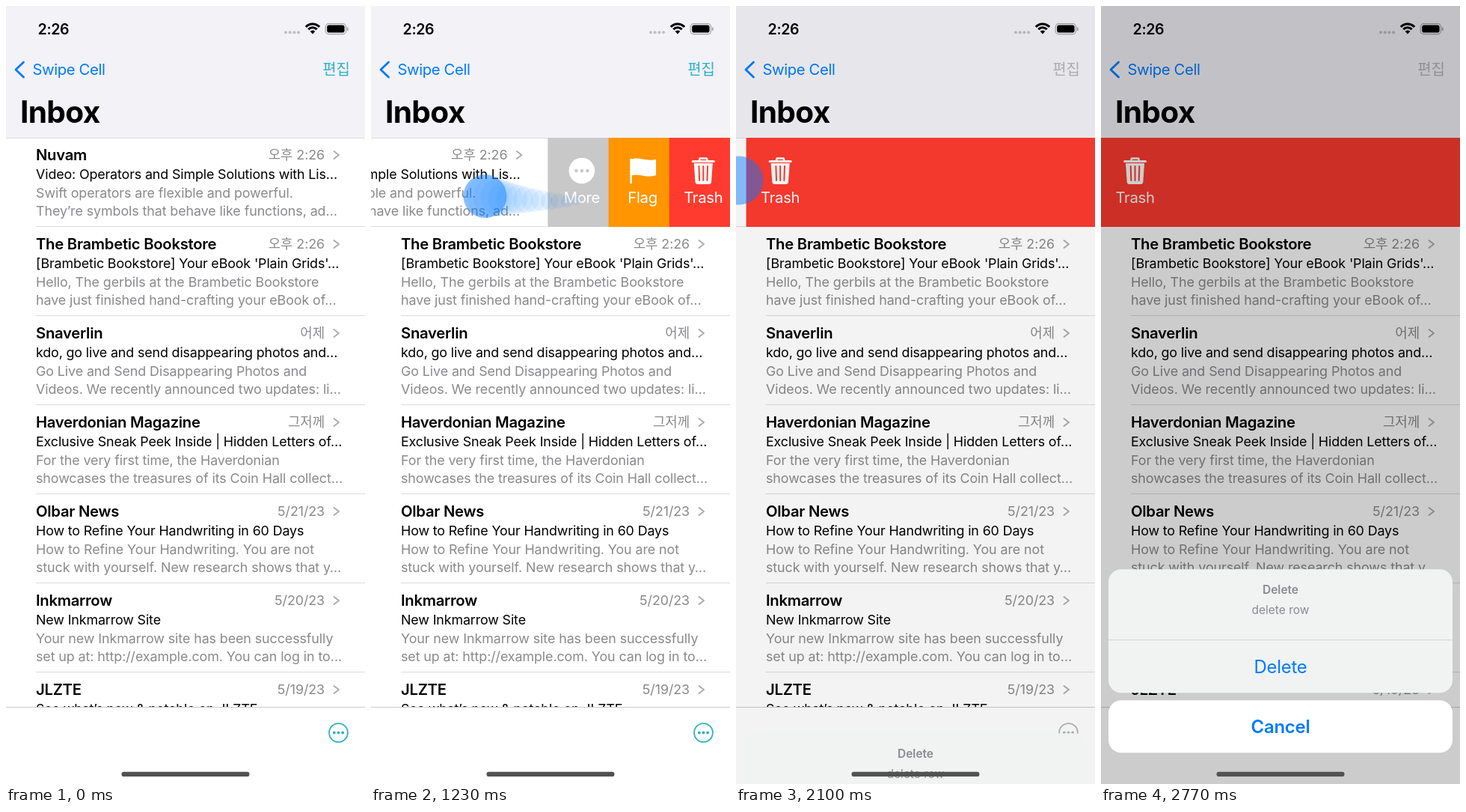
These frames come from a looping animation (480 by 1039 pixels, 3020 ms). An HTML page with a canvas:

```html
<!DOCTYPE html>
<html lang="ko">
<head>
<meta charset="utf-8">
<title>Inbox</title>
<style>
html, body { margin: 0; width: 100%; height: 100%; overflow: hidden; background: #fff; }
canvas { display: block; width: 480px; height: 1039px; }
</style>
</head>
<body>
<canvas id="stage"></canvas>
<script>
const W = 480, H = 1039, LOOP = 3020;
const ROW_TOP = 176, ROW_H = 119, BAR_TOP = 936;
const TOUCH = 970, EXPAND = 1400, RELEASE = 2000, SHEET = 2030;
const FONT = 'Inter, "Noto Sans CJK KR", "Noto Sans CJK", sans-serif';
const BLUE = '#007aff', TEAL = '#30b0c7', GRAY = '#8a8a8d';

const canvas = document.getElementById('stage');
const ctx = canvas.getContext('2d');
const dpr = window.devicePixelRatio || 1;
canvas.width = W * dpr;
canvas.height = H * dpr;

const mails = [
  ['Nuvam', '오후 2:26', 'Video: Operators and Simple Solutions with Lis…',
    'Swift operators are flexible and powerful.', 'They’re symbols that behave like functions, ad…'],
  ['The Brambetic Bookstore', '오후 2:26', "[Brambetic Bookstore] Your eBook 'Plain Grids'…",
    'Hello, The gerbils at the Brambetic Bookstore', 'have just finished hand-crafting your eBook of…'],
  ['Snaverlin', '어제', 'kdo, go live and send disappearing photos and…',
    'Go Live and Send Disappearing Photos and', 'Videos. We recently announced two updates: li…'],
  ['Haverdonian Magazine', '그저께', 'Exclusive Sneak Peek Inside | Hidden Letters of…',
    'For the very first time, the Haverdonian', 'showcases the treasures of its Coin Hall collect…'],
  ['Olbar News', '5/21/23', 'How to Refine Your Handwriting in 60 Days',
    'How to Refine Your Handwriting. You are not', 'stuck with yourself. New research shows that y…'],
  ['Inkmarrow', '5/20/23', 'New Inkmarrow Site',
    'Your new Inkmarrow site has been successfully', 'set up at: http://example.com. You can log in to…'],
  ['JLZTE', '5/19/23', 'See what’s new & notable on JLZTE', '', '']
];

// [time, value] keys
const fingerX = [[970, 418], [1080, 275], [1230, 153], [1350, 122], [1500, 44], [1620, 14], [1800, 7]];
const fingerY = [[970, 242], [1080, 260], [1230, 254], [1350, 248], [1500, 236], [1620, 233.5], [1800, 233]];
const swipe = [[970, 0], [1080, -121], [1230, -243], [1350, -287], [1500, -368], [1620, -428], [1800, -458]];

// Smooth curve through the keys, flat at both ends
function track(keys, t) {
  const last = keys.length - 1;
  if (t <= keys[0][0]) return keys[0][1];
  if (t >= keys[last][0]) return keys[last][1];
  let i = 0;
  while (t > keys[i + 1][0]) i++;
  const slope = k => k === 0 || k === last ? 0 :
    (keys[k + 1][1] - keys[k - 1][1]) / (keys[k + 1][0] - keys[k - 1][0]);
  const [t0, a] = keys[i], [t1, b] = keys[i + 1];
  const d = t1 - t0, u = (t - t0) / d, u2 = u * u, u3 = u2 * u;
  return a * (2 * u3 - 3 * u2 + 1) + b * (3 * u2 - 2 * u3) +
    d * (slope(i) * (u3 - 2 * u2 + u) + slope(i + 1) * (u3 - u2));
}

// Critically damped spring: 0 at start, tends to 1
function settle(ms, rate) {
  const x = Math.max(0, ms) / 1000 * rate;
  return 1 - (1 + x) * Math.exp(-x);
}

function text(str, x, y, size, color, { weight = 400, align = 'left', gap = 0 } = {}) {
  ctx.font = `${weight} ${size}px ${FONT}`;
  ctx.letterSpacing = gap + 'px';
  ctx.textAlign = align;
  ctx.fillStyle = color;
  ctx.fillText(str, x, y);
}

function rect(x, y, w, h, color) {
  ctx.fillStyle = color;
  ctx.fillRect(x, y, w, h);
}

function pill(x, y, w, h, r, color) {
  ctx.fillStyle = color;
  ctx.beginPath();
  ctx.roundRect(x, y, w, h, r);
  ctx.fill();
}

function disc(x, y, r, color) {
  ctx.fillStyle = color;
  ctx.beginPath();
  ctx.arc(x, y, r, 0, Math.PI * 2);
  ctx.fill();
}

function dots(x, y, r, step, color) {
  for (let i = -1; i <= 1; i++) disc(x + i * step, y, r, color);
}

function line(points, width, color) {
  ctx.strokeStyle = color;
  ctx.lineWidth = width;
  ctx.lineCap = ctx.lineJoin = 'round';
  ctx.beginPath();
  points.forEach(([x, y]) => ctx.lineTo(x, y));
  ctx.stroke();
}

function drawMail([from, date, subject, first, second], x, y) {
  const body = { gap: -0.1 };
  text(from, x + 40, y + 30, 20.3, '#000', { weight: 600, gap: -0.28 });
  text(date, x + 426, y + 29, 17.9, GRAY, { align: 'right', gap: -0.1 });
  line([[x + 438.5, y + 18], [x + 445, y + 23], [x + 438.5, y + 28]], 2, '#adadb0');
  text(subject, x + 40, y + 55, 17.9, '#000', { gap: -0.15 });
  text(first, x + 40, y + 79.7, 17.9, GRAY, body);
  text(second, x + 40, y + 104.3, 17.9, GRAY, body);
  rect(x + 40, y + 118, 440, 1, '#dcdcde');
}

function moreIcon(x) {
  disc(x, 220, 17.3, '#fff');
  dots(x, 220, 2.3, 7.5, '#c8c8c8');
}

function flagIcon(x) {
  line([[x - 15.5, 205], [x - 15.5, 236]], 2.6, '#fff');
  ctx.fillStyle = '#fff';
  ctx.beginPath();
  ctx.moveTo(x - 16, 205.5);
  ctx.bezierCurveTo(x - 7, 200, x + 2, 208, x + 18, 205);
  ctx.lineTo(x + 18, 226);
  ctx.bezierCurveTo(x + 3, 231, x - 5, 222, x - 16, 227);
  ctx.fill();
}

function trashIcon(x) {
  line([[x - 14, 207.5], [x + 14, 207.5]], 3, '#fff');
  line([[x - 5.5, 207], [x - 4.5, 203.5], [x + 4.5, 203.5], [x + 5.5, 207]], 2.6, '#fff');
  ctx.fillStyle = '#fff';
  ctx.beginPath();
  ctx.moveTo(x - 12.5, 210);
  ctx.lineTo(x + 12.5, 210);
  ctx.lineTo(x + 10.8, 235);
  ctx.quadraticCurveTo(x + 10.5, 238, x + 7.5, 238);
  ctx.lineTo(x - 7.5, 238);
  ctx.quadraticCurveTo(x - 10.5, 238, x - 10.8, 235);
  ctx.fill();
  for (const s of [-1, 0, 1]) line([[x + s * 5.8, 214], [x + s * 5.2, 233]], 2, '#ff3b30');
}

const actions = [
  ['More', '#c8c8c8', moreIcon],
  ['Flag', '#ff9500', flagIcon],
  ['Trash', '#ff3b30', trashIcon]
];

function drawActions(offset, grown) {
  const edge = W + offset;
  actions.forEach(([label, color, icon], i) => {
    const shift = -offset * i / 3 * (i === 2 ? 1 - grown : 1);
    const x = edge + shift;
    rect(x, ROW_TOP, W - x, ROW_H, color);
    icon(x + 45.5);
    text(label, x + 45.5, 263, 20.3, '#fff', { align: 'center', gap: -0.3 });
  });
}

function drawStatus() {
  text('2:26', 42.6, 37.5, 19.6, '#000', { weight: 600, gap: -0.4 });
  for (let i = 0; i < 4; i++) disc(374 + i * 5.7, 35.2, 2, '#bfbfc3');
  ctx.strokeStyle = '#000';
  ctx.lineCap = 'butt';
  ctx.lineWidth = 3;
  for (const r of [12.5, 7.8]) {
    ctx.beginPath();
    ctx.arc(410, 36.5, r, -Math.PI * 0.76, -Math.PI * 0.24);
    ctx.stroke();
  }
  ctx.fillStyle = '#000';
  ctx.beginPath();
  ctx.moveTo(410, 37.5);
  ctx.arc(410, 37, 4.6, -Math.PI * 0.76, -Math.PI * 0.24);
  ctx.fill();
  ctx.strokeStyle = '#a3a3a7';
  ctx.lineWidth = 1.2;
  ctx.beginPath();
  ctx.roundRect(427.2, 23.6, 27.4, 14, 4.5);
  ctx.stroke();
  pill(429.2, 25.6, 23.4, 10, 2.8, '#000');
  pill(456, 28.2, 1.7, 5, 1, '#a3a3a7');
}

function drawNav(tint) {
  rect(0, 0, W, ROW_TOP, '#f2f2f7');
  drawStatus();
  line([[23.5, 75], [13, 85], [23.5, 95]], 2.8, BLUE);
  text('Swipe Cell', 35.5, 92, 20.3, BLUE, { gap: -0.4 });
  text('편집', 460, 92, 20, tint, { align: 'right' });
  text('Inbox', 19, 156, 40.6, '#000', { weight: 700, gap: -0.65 });
}

function drawToolbar(tint) {
  rect(0, BAR_TOP, W, H - BAR_TOP, '#fff');
  rect(0, BAR_TOP, W, 1, '#cbcbcd');
  ctx.strokeStyle = tint;
  ctx.lineWidth = 1.8;
  ctx.beginPath();
  ctx.arc(444.5, 970.5, 12.4, 0, Math.PI * 2);
  ctx.stroke();
  dots(444.5, 970.5, 1.9, 5.7, tint);
}

function drawSheet(shift) {
  const y = 752 + shift;
  pill(10, y, 460, 165, 17, '#f1f3f3');
  text('Delete', 240, y + 33, 15.5, GRAY, { align: 'center', weight: 600 });
  text('delete row', 240, y + 60, 15.5, GRAY, { align: 'center' });
  rect(10, y + 94, 460, 1, '#d2d4d4');
  text('Delete', 240, y + 139, 23.9, BLUE, { align: 'center', gap: -0.2 });
  pill(10, y + 175, 460, 70, 17, '#fff');
  text('Cancel', 240, y + 219, 23.9, BLUE, { align: 'center', weight: 600, gap: -0.2 });
}

function drawTouch(t) {
  if (t < TOUCH) return;
  const r = 29 - 3 * Math.min(1, Math.max(0, (t - 1600) / 200));
  if (t < RELEASE) {
    for (let age = 150; age > 0; age -= 12) {
      const s = t - age;
      if (s >= TOUCH) {
        disc(track(fingerX, s), track(fingerY, s), r * (1 - age / 195), 'rgba(10,122,255,0.08)');
      }
    }
  }
  const grow = Math.max(0, (t - 2050) / 180);
  const alpha = 0.48 * Math.min(1, 1 - (t - 2230) / 110);
  if (alpha <= 0) return;
  disc(track(fingerX, t) - 11 * grow, track(fingerY, t), r + 23 * grow, `rgba(10,122,255,${alpha})`);
}

function draw(t) {
  const shown = settle(t - SHEET, 13);
  const drag = track(swipe, t);
  const offset = drag + (-W - drag) * settle(t - RELEASE, 13);
  const tint = shown > 0 ? '#b4b4b8' : TEAL;

  ctx.setTransform(dpr, 0, 0, dpr, 0, 0);
  rect(0, 0, W, H, '#fff');
  mails.forEach((mail, i) => drawMail(mail, i ? 0 : offset, ROW_TOP + i * ROW_H));
  drawNav(tint);
  rect(0, ROW_TOP, W, 1, '#dedee2');
  if (offset < 0) drawActions(offset, settle(t - EXPAND, 21.8));
  drawToolbar(tint);

  if (shown > 0) {
    rect(0, 0, W, H, `rgba(0,0,0,${0.2 * shown})`);
    drawSheet(287 * (1 - shown));
  }
  pill(154.5, 1022.8, 171, 6.2, 3.1, '#525252');
  drawTouch(t);
}

const start = performance.now();
function tick() {
  draw((performance.now() - start) % LOOP);
  requestAnimationFrame(tick);
}
tick();
</script>
</body>
</html>
```
